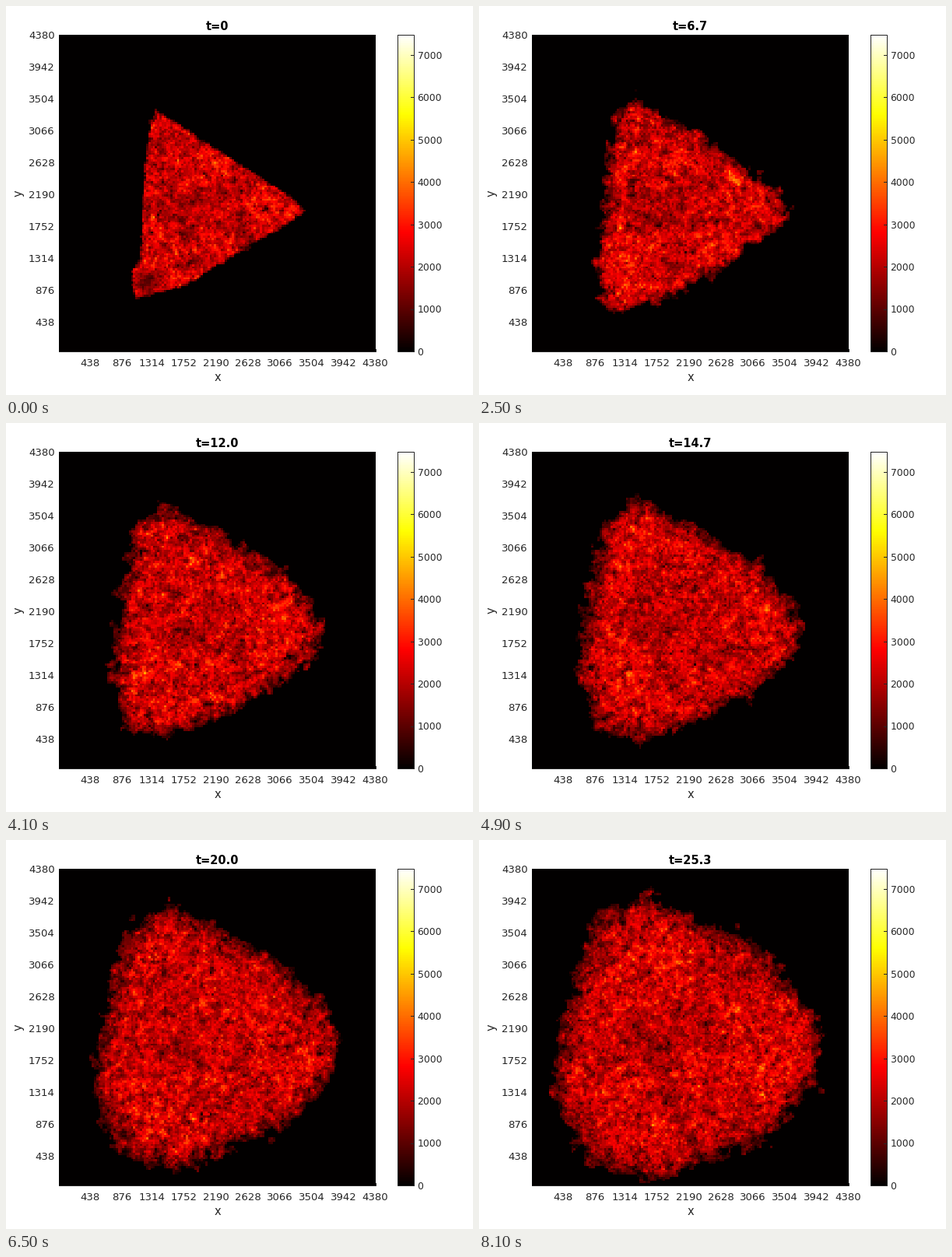
A matplotlib script that plays this animation: 600 by 500 pixels, repeating every 8.2 s.

```python
import numpy as np
import matplotlib.pyplot as plt
from matplotlib.animation import FuncAnimation
from matplotlib.colors import LinearSegmentedColormap
from matplotlib.path import Path

W, H, DPI = 600, 500, 100
FRAMES, HOLD = 82, 5          # the opening picture is held for HOLD ticks
STEPS = FRAMES - HOLD - 1     # growth steps, three per time unit
N = 145                       # grid cells per side
LEFT, RIGHT, TOP, BOTTOM = 68, 475, 37.5, 444.5
VMAX = 7478
INK = "#262626"

plt.rcParams["font.family"] = "DejaVu Sans"
hot = LinearSegmentedColormap("hot256", {
    "red": [(0, 0.01, 0.01), (0.375, 1, 1), (1, 1, 1)],
    "green": [(0, 0, 0), (0.375, 0, 0), (0.75, 1, 1), (1, 1, 1)],
    "blue": [(0, 0, 0), (0.75, 0, 0), (1, 1, 1)],
}, N=256)

# Key points of the colony's edge, clockwise from the top
START = np.array([(193, 134), (265, 180), (325, 219), (365, 243), (386, 265),
                  (360, 282), (295, 320), (235, 358), (166, 379), (163, 370),
                  (162, 342), (172, 325), (177, 220), (185, 148)], float)
END = np.array([(218, 67), (300, 106), (375, 147), (416, 200), (446, 245),
                (432, 322), (372, 386), (290, 415), (228, 443), (140, 416),
                (125, 395), (92, 320), (110, 212), (145, 98)], float)

step = (np.arange(N) + 0.5) / N
GX, GY = np.meshgrid(LEFT + step * (RIGHT - LEFT), TOP + step * (BOTTOM - TOP))
CELLS = np.column_stack([GX.ravel(), GY.ravel()])


def noise(seed, passes):
    """Seeded unit noise, blurred `passes` times."""
    a = np.random.default_rng(seed).standard_normal((N, N))
    for _ in range(passes):
        for axis in (0, 1):
            a = (np.roll(a, 1, axis) + 2 * a + np.roll(a, -1, axis)) / 4
    return a / a.std()


def flow(k, span, seed, passes):
    """Noise that drifts to a fresh field every `span` steps."""
    i, f = divmod(k / span, 1)
    a = noise(seed + int(i), passes)
    b = noise(seed + int(i) + 1, passes)
    return (a * (1 - f) + b * f) / np.hypot(1 - f, f)


def depth(ring):
    """Distance to the outline, positive inside."""
    best = np.full(len(CELLS), np.inf)
    for a, b in zip(ring, np.roll(ring, -1, axis=0)):
        d = b - a
        u = np.clip((CELLS - a) @ d / (d @ d), 0, 1)
        gap = CELLS - a - u[:, None] * d
        best = np.minimum(best, (gap ** 2).sum(axis=1))
    sign = np.where(Path(ring).contains_points(CELLS), 1, -1)
    return (sign * np.sqrt(best)).reshape(N, N)


def spot(x, y, r):
    return np.exp(-((GX - x) ** 2 + (GY - y) ** 2) / r ** 2)


BROAD = noise(900, 30)
CORE = spot(230, 262, 50)
CORNER = spot(181, 354, 14)


def density(k):
    t = k / 3
    grown = min(t / 8, 1)
    d = depth(START + (END - START) * k / STEPS)
    d += (0.3 + 3.2 * grown) * flow(k, 20, 100, 6)
    d += (0.6 + 1.8 * grown) * flow(k, 5, 200, 1)

    rim = np.clip(d / (4 + 30 * min(t / 16, 1)), 0, 1)
    rim = np.sin(rim * np.pi / 2)
    level = 2250 * (0.25 + 0.75 * rim)
    level *= 1 + 0.05 * BROAD - 0.18 * CORE
    level *= 1 - 0.55 * CORNER * max(0, 1 - t / 5)
    grain = (0.65 * flow(k, 3, 300, 0) + 0.6 * flow(k, 3, 400, 1)
             + 0.45 * flow(k, 6, 500, 3))
    v = level * np.clip(1 + (0.25 + 0.2 * (1 - rim)) * grain, 0.1, None)
    return np.where(d > 0, v, 0)


def px(n):
    return n * 72 / DPI


fig = plt.figure(figsize=(W / DPI, H / DPI), dpi=DPI, facecolor="white")
ax = fig.add_axes([0, 0, 1, 1])
ax.axis("off")


def label(x, y, s, size, ha="center", color=INK, **kw):
    return ax.text(x, y, s, fontsize=px(size), ha=ha, va="baseline", color=color, **kw)


def line(xs, ys):
    ax.plot(xs, ys, color=INK, lw=px(1), snap=False,
            solid_capstyle="projecting", solid_joinstyle="miter")


def image(data, top, left, right):
    return ax.imshow(data, cmap=hot, vmin=0, vmax=top, aspect="auto",
                     interpolation="nearest", extent=(left, right, BOTTOM, TOP))


heat = image(np.zeros((N, N)), VMAX, LEFT, RIGHT)
line([LEFT + 0.5, RIGHT + 0.5, RIGHT + 0.5], [BOTTOM, BOTTOM, BOTTOM - 3])

for i in range(1, 11):
    off = 41 * (10 - i)
    s = str(438 * i)
    label(62.5, 42 + off, s, 13.2, "right")
    label(474.5 - off + 2 * (len(s) < 4), 463, s, 13.2)
label(272, 482, "x", 14.67)
label(20.5, 241, "y", 14.67, rotation=90, rotation_mode="anchor")
title = label(271.7, 31, "", 14.67, color="black", weight="bold")

# Colour bar
BAR_L, BAR_R = 503.5, 524.5
image(np.linspace(1, 0, 256)[:, None], 1, BAR_L, BAR_R)
line([BAR_L, BAR_R, BAR_R, BAR_L, BAR_L], [TOP, TOP, BOTTOM, BOTTOM, TOP])
for v in range(0, 8000, 1000):
    y = BOTTOM - v / VMAX * (BOTTOM - TOP)
    line([BAR_R - 4, BAR_R], [int(y) + 0.5] * 2)
    label(528.5, y + 4.4, str(v), 12.4, "left")

ax.set_xlim(0, W)
ax.set_ylim(H, 0)


def draw(n):
    k = max(0, n - HOLD)
    heat.set_data(density(k))
    title.set_text("t=0" if n < HOLD else f"t={k / 3:.1f}")
    return heat, title


anim = FuncAnimation(fig, draw, frames=FRAMES, interval=100, repeat=True,
                     repeat_delay=0, blit=False)
plt.show()
```
